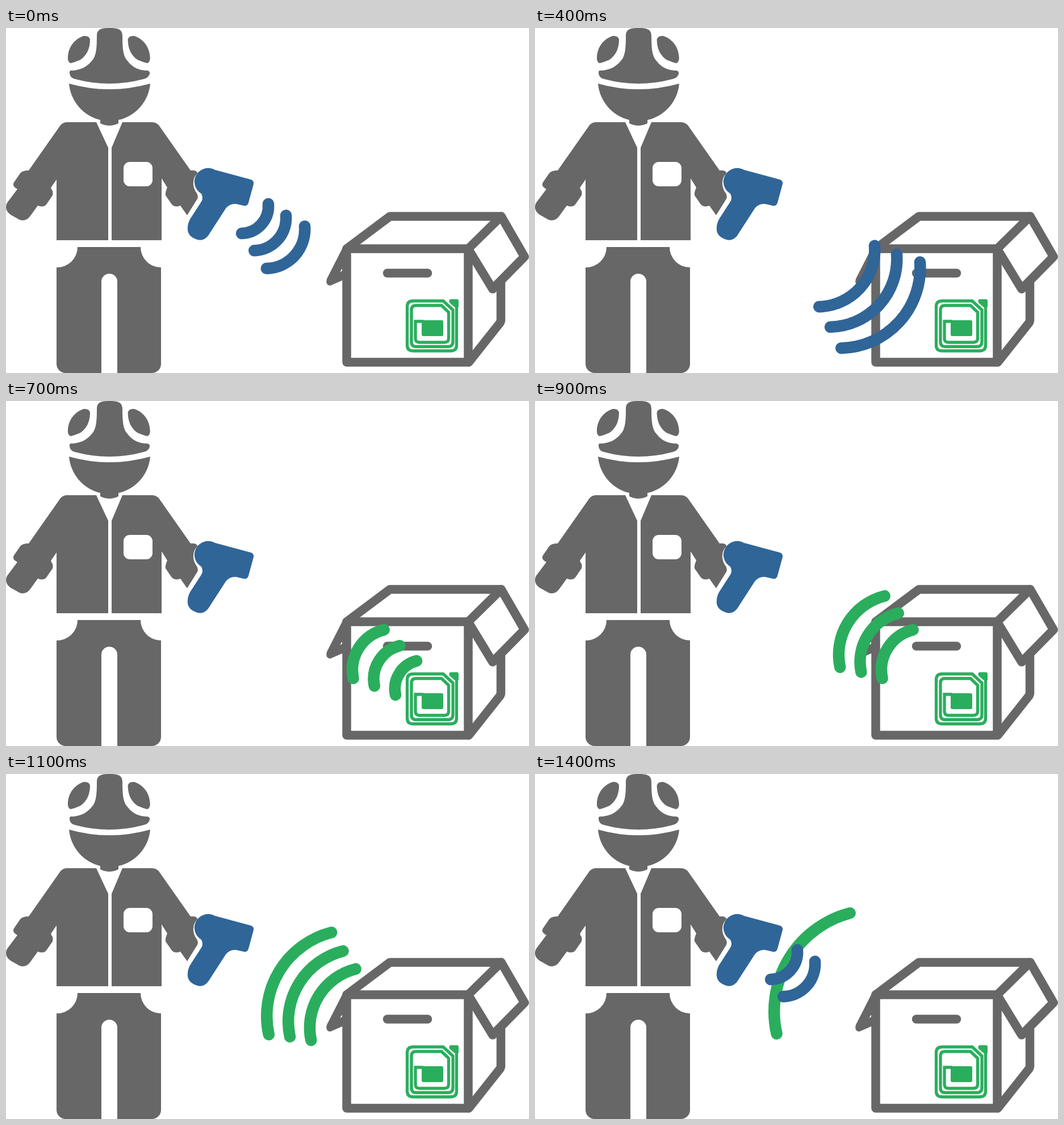
These frames come from a looping animation (921 by 608 pixels, 1500 ms). An HTML page:

```html
<!DOCTYPE html>
<html lang="en">
<head>
<meta charset="utf-8">
<title>Tag scanning</title>
<style>
  html, body { margin: 0; width: 100%; height: 100%; overflow: hidden; background: #fff; }
  svg { display: block; width: 100%; height: 100%; }
  .grey { fill: #676767; }
  .blue { fill: #306598; }
  .green { fill: #2aae5d; }
  .white { fill: #fff; }
  .box { fill: none; stroke: #676767; stroke-width: 15.5; stroke-linejoin: round; stroke-linecap: round; }
  .coil { fill: none; stroke: #2aae5d; stroke-width: 5.3; }
  .wave { fill: none; stroke-width: 20.5; stroke-linecap: round; animation: pulse 1.5s step-end infinite; }
  .ping { stroke: #306598; }
  .reply { stroke: #2aae5d; }
  @keyframes pulse {
    0% { visibility: visible; }
    20%, 100% { visibility: hidden; }
  }
</style>
</head>
<body>
<svg viewBox="0 0 921 608">
  <!-- worker -->
  <g class="grey">
    <path d="M160 14C160 2 168 0 182 0C197 0 205 2 205 14C205 35 206 50 214 58C223 70 235 75 249 75Q254 76 253 81Q251 88 242 90Q182 106 122 90Q113 88 112 80Q111 74 117 75C130 74 141 70 151 58C159 50 160 35 160 14Z"/>
    <path id="ear" d="M137 14Q146 13 148 20C148 38 141 49 131 56Q122 60 114 62Q108 60 109 51C110 33 121 19 137 14Z"/>
    <use href="#ear" transform="matrix(-1 0 0 1 362.6 0)"/>
    <path d="M111 98Q182 118 254 98A72 72 0 0 1 198 162V168Q182 176 166 168V162A72 72 0 0 1 111 98Z"/>
    <path d="M107 166H159L180 211V374H89V267L80 280Q78 283 82 287Q83 291 82 295L71 311Q66 317 56 313L43 331Q35 342 24 338L8 329Q-4 320 2 308L20 284Q10 279 14 272L25 256Q29 251 40 251L94 174Q99 166 107 166Z"/>
    <path d="M205 166H257Q266 166 271 174L325 251H331Q337 252 337 256Q329 264 330 276Q331 285 336 291Q339 296 337 301L319 330L307 313Q298 317 292 311L281 295Q280 290 284 281L274 265V374H186V211Z"/>
    <path d="M126 386H237A36 36 0 0 0 273 422V592A16 16 0 0 1 257 608H196V447A14 14 0 0 0 168 447V608H105A16 16 0 0 1 89 592V422A36.5 36 0 0 0 126 386Z"/>
  </g>
  <rect class="white" x="207" y="236" width="51" height="43" rx="11"/>
  <path class="blue" d="M368 250L431 267Q437 269 436 275L427 308Q425 315 418 313L405 310Q394 309 387 318L356 366Q348 376 337 373Q318 367 320 351Q320 345 324 337L344 306Q348 300 344 292A23 23 0 0 1 368 250Z"/>

  <!-- box -->
  <path class="grey" d="M594 385L565 442Q562 453 571 454L594 444Z"/>
  <path class="white" d="M592 424L588 430L592 428Z"/>
  <g class="box">
    <path d="M600 389H814V589H600Z"/>
    <path d="M600 389L676 332H872L814 389"/>
    <path d="M872 332L913 403L857 460L815 391"/>
    <path d="M871.5 450V515Q871 519 868 522L815 589"/>
    <path d="M671.5 432H742.5"/>
  </g>

  <!-- tag -->
  <path class="coil" d="M793.5 482V559Q793.5 569 783 569H717Q706.5 569 706.5 559V491Q706.5 481 717 481H770L787 497V553Q787 561.5 778 561.5H722Q714 561.5 714 553V497Q714 489 722 489H767L779.5 501V547Q779.5 554 772 554H728Q721 554 721 547V517H735"/>
  <rect class="green" x="732" y="515" width="38" height="28" rx="3"/>
  <path class="green" d="M783 478H794Q797 478 797 481V492H790L781 484Q779 479 783 478Z"/>

  <g id="far"></g>
  <g id="replies"></g>
  <g id="near"></g>
</svg>
<script>
  const LOOP = 1500, STEP = 100;

  // Draws a clockwise arc whose radius is proportional to its chord
  function addWave(layer, kind, x1, y1, x2, y2, bend, start) {
    const r = bend * Math.hypot(x2 - x1, y2 - y1);
    const path = document.createElementNS("http://www.w3.org/2000/svg", "path");
    path.setAttribute("class", "wave " + kind);
    path.setAttribute("d", `M${x1} ${y1}A${r} ${r} 0 0 1 ${x2} ${y2}`);
    path.style.animationDelay = (start > 0 ? start - LOOP : start) + "ms";
    document.getElementById(layer).append(path);
  }

  // Position after i steps, with a first step and a gentle acceleration
  const travel = (from, speed, accel, i) => from + speed * i + accel * i * i;

  for (let i = 0; i < 7; i++) {
    addWave(i < 2 ? "near" : "far", "ping",
      travel(462, 30, 1, i), travel(310, 21, -0.65, i),
      travel(415, 22.5, -0.3, i), travel(362, 29.5, 0.7, i),
      0.69, (i - 2) * STEP);
  }

  for (let i = 0; i < 8; i++) {
    addWave("replies", "reply",
      travel(686, -37.2, 0, i), travel(518, -17, 1.2, i),
      travel(723, -30.5, 0.92, i), travel(458, -26.2, -0.6, i),
      0.72, (i + 5) * STEP);
  }
</script>
</body>
</html>
```
